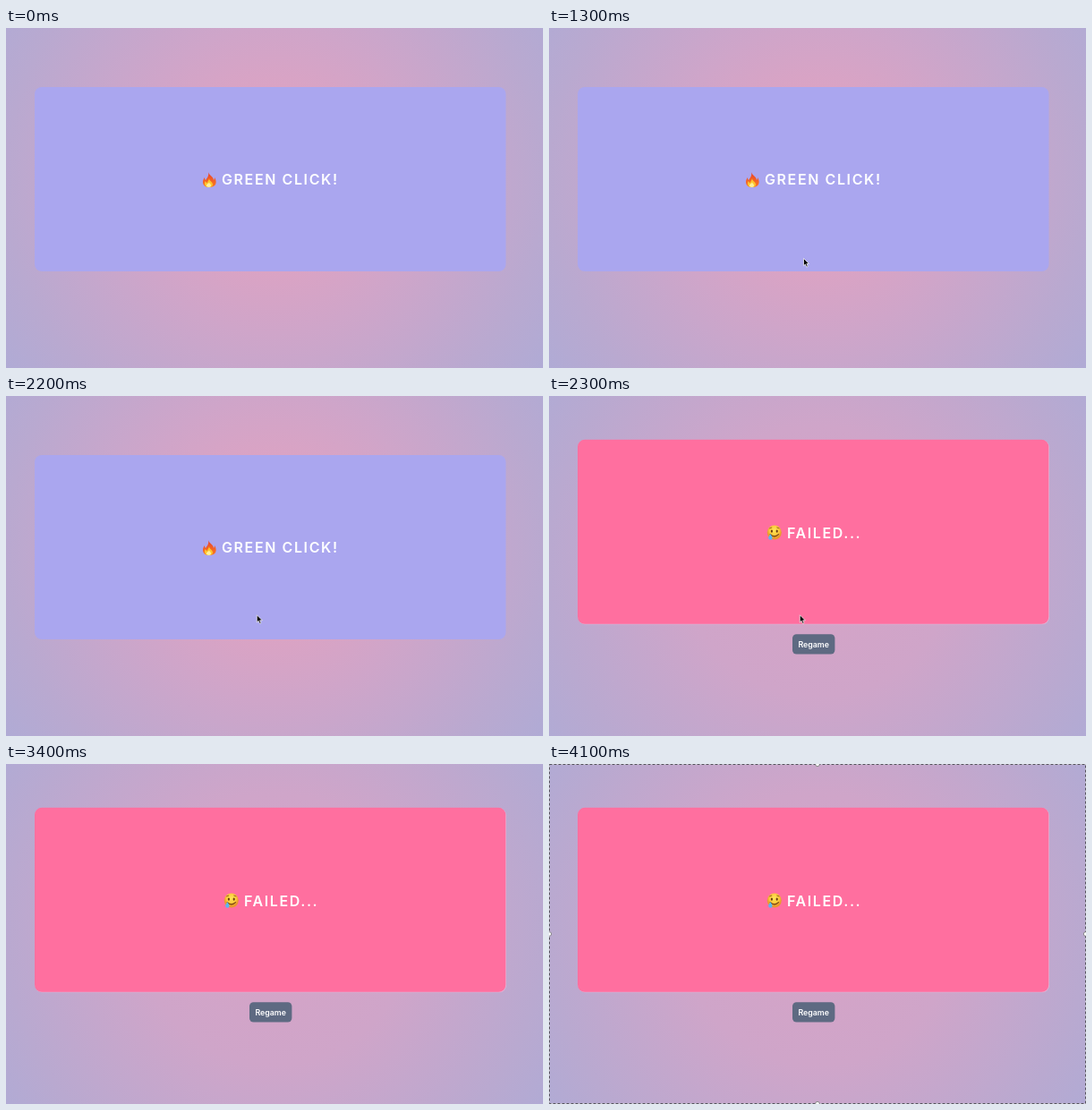
An HTML page for the animation above (4.9 s loop, 600x380 px).

```html
<!DOCTYPE html>
<html lang="en">
<head>
<meta charset="utf-8">
<title>Reaction game</title>
<style>
  html, body { margin: 0; width: 100%; height: 100%; overflow: hidden; }
  svg { display: block; width: 600px; height: 380px; }
  text { font-family: Inter, "Liberation Sans", sans-serif; font-weight: 600; fill: #fff; }
  .title { font-size: 16px; letter-spacing: 1.6px; }
  .button { font-size: 8.8px; text-anchor: middle; }
</style>
</head>
<body>
<svg viewBox="0 0 600 380">
  <defs>
    <radialGradient id="warm" gradientUnits="userSpaceOnUse" cx="300" cy="170" r="380">
      <stop offset="0" stop-color="#e2a1c0"/>
      <stop offset=".27" stop-color="#daa3c4"/>
      <stop offset=".45" stop-color="#cfa5c9"/>
      <stop offset=".79" stop-color="#b9a9d0"/>
      <stop offset="1" stop-color="#aeabd6"/>
    </radialGradient>
    <radialGradient id="cool" gradientUnits="userSpaceOnUse" cx="300" cy="185" r="380">
      <stop offset="0" stop-color="#d6a3c6"/>
      <stop offset=".4" stop-color="#cfa5c9"/>
      <stop offset=".79" stop-color="#b9a9d0"/>
      <stop offset="1" stop-color="#aeabd6"/>
    </radialGradient>
    <linearGradient id="flame" x2="0" y2="1">
      <stop offset="0" stop-color="#e8432e"/>
      <stop offset="1" stop-color="#fb7a1e"/>
    </linearGradient>
    <radialGradient id="skin" cy=".35">
      <stop offset="0" stop-color="#ffe65a"/>
      <stop offset=".65" stop-color="#fccb3c"/>
      <stop offset="1" stop-color="#e99a2c"/>
    </radialGradient>
  </defs>

  <g id="ready">
    <rect width="600" height="380" fill="url(#warm)"/>
    <rect x="32" y="66" width="526.5" height="206" rx="8" fill="#aaa6ef"/>
    <g transform="translate(219 161)">
      <path d="M7 0C8 4 13 5 13 9c1-1 1-2 1-3 2 3 2 6 1 8-1 2-4 3-7 3-5 0-7-3-7-6 0-2 1-4 2-5 0 1 0 2 1 3C6 6 8 4 7 0Z" fill="url(#flame)"/>
      <path d="M8 7c0 3 4 4 4 7 0 2-2 3-4 3-3 0-5-1-5-4 0-1 0-2 1-3 0 1 1 2 2 2C6 10 8 9 8 7Z" fill="#fdc52c"/>
      <path d="M8 11c0 2 2 2 2 4 0 1-1 2-2 2-2 0-3-1-3-2 0-2 3-2 3-4Z" fill="#fff09a"/>
    </g>
    <text class="title" x="241" y="175">GREEN CLICK!</text>
  </g>

  <g id="failed">
    <rect width="600" height="380" fill="url(#cool)"/>
    <rect x="32.5" y="49.3" width="526.5" height="206" rx="8" fill="#e4b4d6"/>
    <rect x="32" y="48.8" width="526.3" height="206" rx="8" fill="#ff6f9f"/>
    <g transform="translate(251.8 152.5)">
      <circle r="8" fill="url(#skin)"/>
      <g fill="none" stroke="#6b3d12" stroke-linecap="round">
        <path d="M-4.6 2.2Q0 6.4 4.6 2.2" stroke-width="1.1"/>
        <path d="M-5.2-4.6L-3-5.4M3-5.4L5.2-4.6" stroke-width=".7"/>
      </g>
      <g fill="#6b3d12">
        <ellipse cx="-2.9" cy="-1.4" rx="1.1" ry="1.6"/>
        <ellipse cx="2.9" cy="-1.4" rx="1.1" ry="1.6"/>
      </g>
      <path d="M-4.5 1.4C-3.2 3.6-2.2 4.7-2.2 6A2.2 2.2 0 0 1-6.6 6C-6.6 4.7-5.3 3.4-4.5 1.4Z" fill="#58b6f2"/>
    </g>
    <text class="title" x="266" y="158.5">FAILED...</text>
    <rect x="272" y="266.2" width="47.4" height="22.4" rx="4.5" fill="#5e6a82"/>
    <text class="button" x="295.7" y="280.6">Regame</text>
  </g>

  <path id="cursor" d="M0 0V8.2L1.9 6.5 3.2 9.6 4.7 9 3.4 6H6Z" fill="#000" stroke="#fff" stroke-width=".7"/>

  <g id="frame" fill="none">
    <rect x=".5" y=".5" width="599" height="379" stroke="#d2cedd"/>
    <rect x=".5" y=".5" width="599" height="379" stroke="#55535c" stroke-dasharray="3 2"/>
    <g fill="#fff" stroke="#777" stroke-width=".8">
      <circle cx="300" cy=".5" r="2.2"/>
      <circle cx="300" cy="379.5" r="2.2"/>
      <circle cx=".5" cy="190" r="2.2"/>
      <circle cx="599.5" cy="190" r="2.2"/>
    </g>
  </g>
</svg>
<script>
  const LOOP = 4900, STEP = 100;
  const [ready, failed, cursor, frame] =
    ["ready", "failed", "cursor", "frame"].map(id => document.getElementById(id));
  // Cursor tip: time, x, y
  const path = [[800, 141.5, 351.5], [1300, 284.5, 257.5], [1900, 280.3, 244.8]];

  const show = (el, on) => el.setAttribute("visibility", on ? "visible" : "hidden");

  function tipAt(t) {
    const i = path.findIndex(p => p[0] > t);
    if (i < 1) return path[i ? path.length - 1 : 0].slice(1);
    const [a, b] = [path[i - 1], path[i]];
    const k = (t - a[0]) / (b[0] - a[0]);
    const e = 1 - (1 - k) ** 2;
    return [1, 2].map(n => a[n] + (b[n] - a[n]) * e);
  }

  function draw() {
    const t = Math.floor(performance.now() % LOOP / STEP) * STEP;
    show(ready, t < 2300);
    show(failed, t >= 2300);
    show(cursor, t >= 800 && t < 3400);
    show(frame, t >= 3900);
    cursor.setAttribute("transform", `translate(${tipAt(t)})`);
    requestAnimationFrame(draw);
  }
  draw();
</script>
</body>
</html>
```
